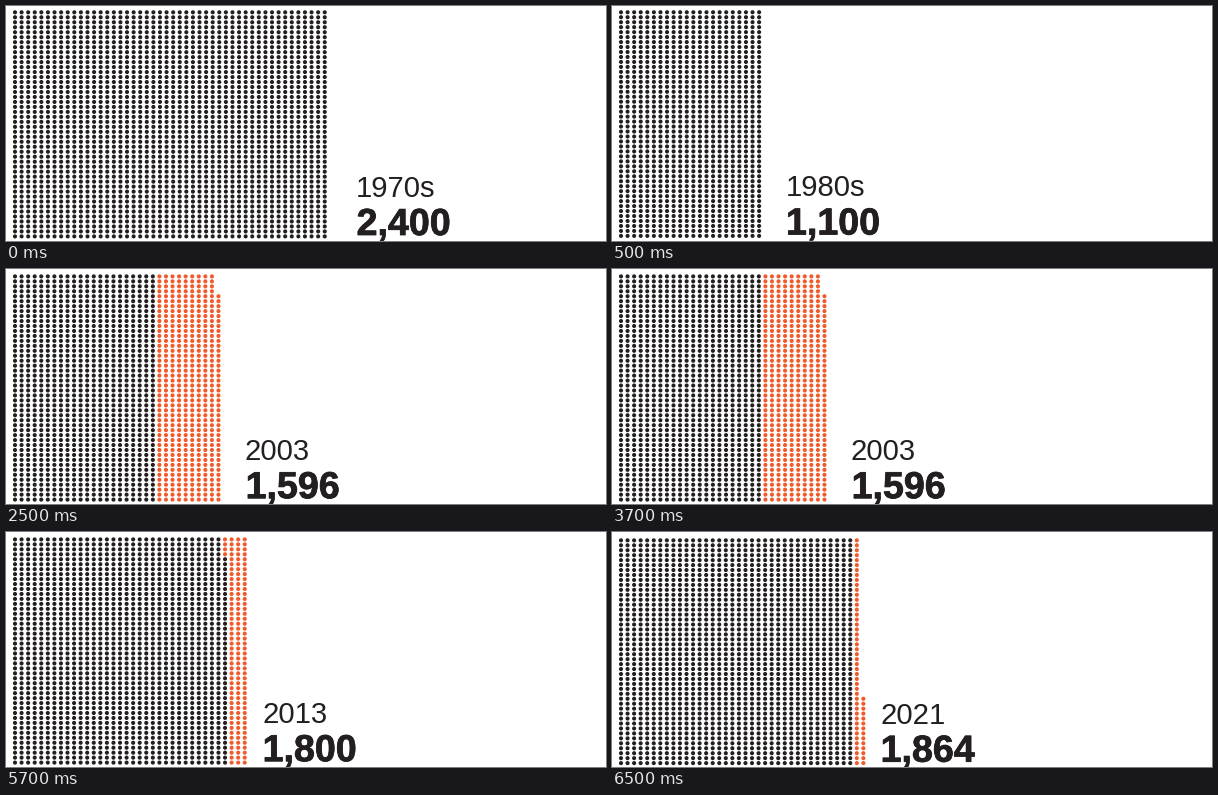
Write a matplotlib script that moves like this. It is 600x235 px and loops after 8 s.

```python
import numpy as np
import matplotlib.pyplot as plt
from matplotlib.animation import FuncAnimation
from matplotlib.patheffects import Normal, Stroke

WIDTH, HEIGHT, DPI = 600, 235, 100
INK, ORANGE = "#231f20", "#f15a2b"
ROWS, PITCH_X, PITCH_Y = 46, 6.59, 4.98
LEFT, BOTTOM, DIAMETER = 9.0, 230.4, 4.1

# start ms, year, count, (columns, gaps in last one), same for black part,
# grid scale, text x, shift down
SCENES = [
    (0, "1970s", "2,400", (48, 0), (48, 0), 1, 350, 0),
    (500, "1980s", "1,100", (22, 0), (22, 0), 0.998, 173.4, -0.5),
    (2500, "2003", "1,596", (32, 4), (22, 0), 0.996, 239, 0.2),
    (4500, "2013", "1,800", (36, 0), (33, 4), 0.996, 256, 0.2),
    (6500, "2021", "1,864", (38, 32), (36, 0), 0.994, 268, 0.7),
]
LOOP, STEP = 8000, 500


def px(size):
    """Convert pixels to points."""
    return size * 72 / DPI


def inside(col, row, extent):
    """Tell which grid cells belong to bottom-aligned filled columns."""
    columns, gaps = extent
    return (col < columns - 1) | ((col == columns - 1) & (row >= gaps))


def build_scene(ax, scene):
    _, year, count, total, black, scale, x, shift = scene
    col, row = np.divmod(np.arange(total[0] * ROWS), ROWS)
    keep = inside(col, row, total)
    col, row = col[keep], row[keep]
    colors = np.where(inside(col, row, black), INK, ORANGE)
    dots = ax.scatter(LEFT + scale * PITCH_X * col,
                      BOTTOM + shift - scale * PITCH_Y * (ROWS - 1 - row),
                      s=px(DIAMETER) ** 2, c=list(colors), linewidths=0,
                      snap=False)
    label = ax.text(x, 191 + shift, year, fontsize=px(29.3), color=INK,
                    family="Liberation Sans", va="baseline")
    number = ax.text(x + 0.6, 229 + shift, count, fontsize=px(37.6), color=INK,
                     family="Liberation Sans", weight="bold", va="baseline")
    number.set_path_effects([Stroke(linewidth=px(0.8), foreground=INK), Normal()])
    return [dots, label, number]


fig = plt.figure(figsize=(WIDTH / DPI, HEIGHT / DPI), dpi=DPI, facecolor="white")
ax = fig.add_axes([0, 0, 1, 1])
ax.set(xlim=(0, WIDTH), ylim=(HEIGHT, 0), autoscale_on=False)
ax.axis("off")
groups = [build_scene(ax, scene) for scene in SCENES]


def update(frame):
    current = sum(scene[0] <= frame * STEP for scene in SCENES) - 1
    for index, group in enumerate(groups):
        for artist in group:
            artist.set_visible(index == current)
    return [artist for group in groups for artist in group]


anim = FuncAnimation(fig, update, frames=LOOP // STEP, interval=STEP,
                     repeat=True, repeat_delay=0)
plt.show()
```
